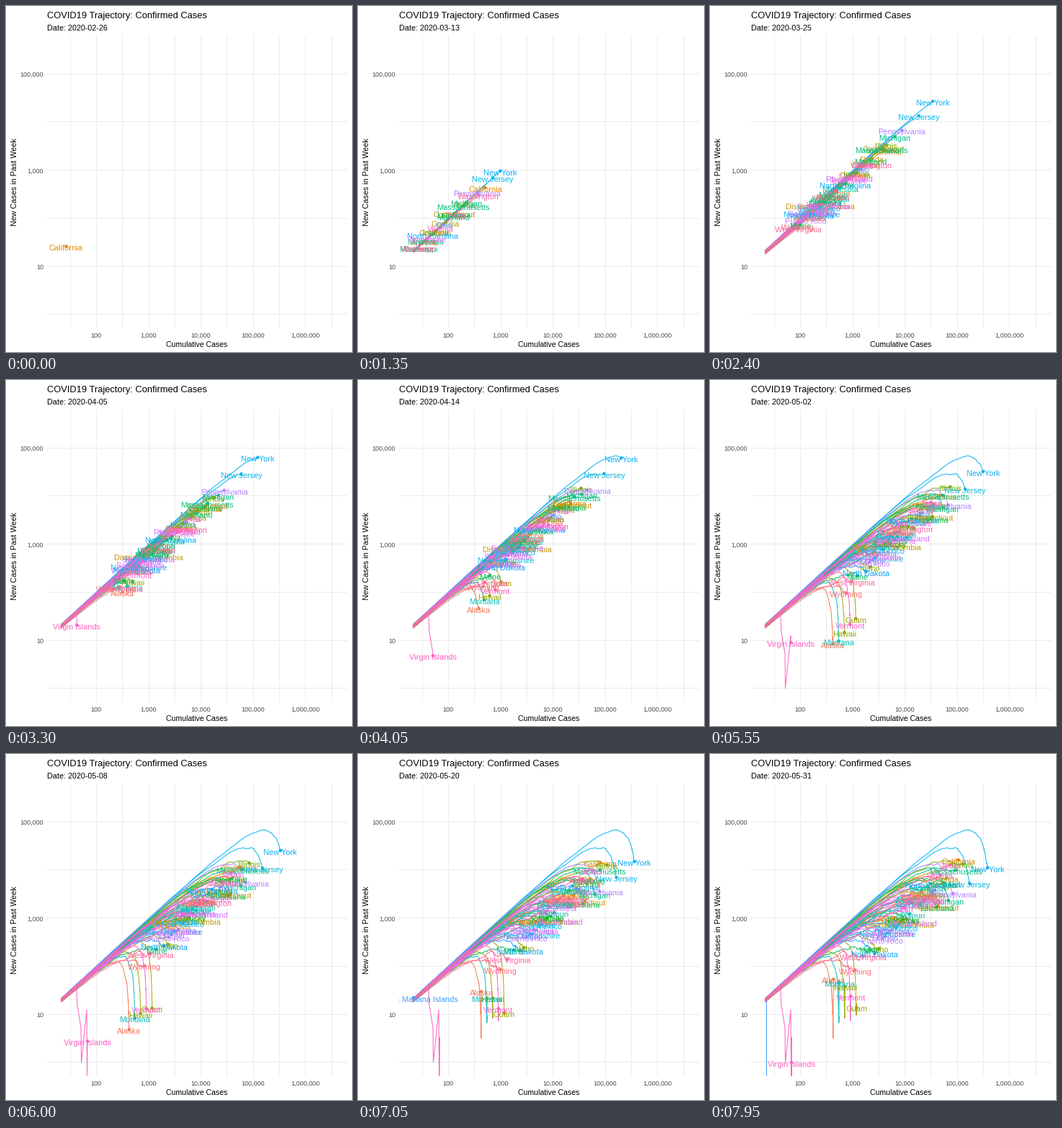
A matplotlib script for the animation above (8000 ms loop, 480 by 480 pixels).

```python
import math

import matplotlib.pyplot as plt
import numpy as np
from matplotlib.animation import FuncAnimation
from matplotlib.collections import LineCollection

SIZE, DPI = 480, 100
LEFT, TOP, RIGHT, BOTTOM = 57, 41, 474, 447
LAST_DAY = 95
MONTHS = ((2, 29), (3, 31), (4, 30), (5, 31))

# Largest outbreak first; the rank sets size and starting day
RANKED = [
    "New York", "New Jersey", "Illinois", "California", "Massachusetts",
    "Pennsylvania", "Texas", "Michigan", "Florida", "Maryland", "Georgia",
    "Virginia", "Connecticut", "Louisiana", "Ohio", "Indiana",
    "North Carolina", "Colorado", "Minnesota", "Tennessee", "Washington",
    "Arizona", "Iowa", "Wisconsin", "Alabama", "Mississippi", "Rhode Island",
    "Nebraska", "Missouri", "South Carolina", "Kansas", "Utah", "Kentucky",
    "Delaware", "District of Columbia", "Nevada", "New Mexico", "Arkansas",
    "Oklahoma", "South Dakota", "New Hampshire", "Oregon", "Puerto Rico",
    "Idaho", "North Dakota", "Maine", "West Virginia", "Wyoming",
]
EARLY = {"California", "Washington"}
COOLING = {"New York", "New Jersey", "Michigan", "Connecticut", "Louisiana",
           "Pennsylvania", "Rhode Island", "Idaho", "North Dakota", "Wyoming"}
GROWING = {"California", "Texas", "Virginia", "North Carolina", "Minnesota",
           "Arizona", "Wisconsin", "Alabama", "Mississippi", "Nebraska",
           "South Carolina", "Utah", "Arkansas"}
FADING = ["Guam", "Vermont", "Hawaii", "Montana", "Alaska"]

plt.rcParams["font.family"] = "Liberation Sans"
rng = np.random.default_rng(19)
tracks = {}


def px_x(cases):
    return 125.5 + 72.6 * (np.log10(cases) - 2)


def px_y(cases):
    return 361 - 66.75 * (np.log10(cases) - 1)


def grow(name, start, total, ratio, k, rebound=0):
    """Exponential growth that slows at rate k to a final weekly share of new cases."""
    span = LAST_DAY - start
    rate = -math.log(1 - ratio) / 7
    rest = math.exp(-k * span)
    gain = (math.log(total / 21) - rate * span) / (1 - rest - k * span * rest)
    drift = rate - gain * k * rest

    def cumulative(tau):
        return 21 * np.exp(gain * (1 - np.exp(-k * tau)) + drift * tau)

    days = np.arange(start, LAST_DAY + 1)
    cases = cumulative(days - start)
    new = cases - cumulative(days - start - 7.0)
    new += rebound * np.clip((days - 74) / 20, 0, 1)
    # Small counts swing more
    noise = np.convolve(rng.normal(size=len(days) + 4), np.ones(5) / 5, "valid")
    swing = (2 + 25 / np.sqrt(new)) * np.clip((days - start) / 30, 0, 1)
    tracks[name] = days, px_x(cases), px_y(new) + noise * swing


def trace(name, *stops):
    """Straight moves between (day, x, y) stops."""
    tracks[name] = tuple(np.array(stops, float).T)


for rank, name in enumerate(RANKED):
    size = 5.575 - 0.59 * rank / (rank + 0.9) - 0.0325 * rank - 0.3 * (rank / 46) ** 16
    start = 5 if name in EARLY else round(9 + rank / 4)
    if name in COOLING:
        ratio, slowing = 0.028 + rank / 1000, 0.075
    elif name in GROWING:
        ratio, slowing = 0.16, 0.055
    else:
        ratio, slowing = 0.095, 0.058
    grow(name, start, 10 ** size, ratio, slowing)

for rank, name in enumerate(FADING):
    grow(name, 19, 10 ** (3.07 - 0.11 * rank), 0.003, 0.115, rebound=8 + 12 * rank)

# California is on the chart from the first day
tracks["California"] = tuple(
    np.r_[first, rest] for first, rest in zip((0, 83, 333), tracks["California"]))

trace("Northern Mariana Islands", (81, 76.5, 338), (88, 77.5, 338), (90, 77.5, 470))
trace("Virgin Islands", (33, 93, 322), (37, 98, 324), (40, 98.5, 346), (48, 104, 380),
      (52, 104.5, 428), (66, 112, 355), (68, 112.5, 446), (72, 113, 393),
      (74, 113, 470), (93, 113, 470), (95, 113, 428))

names = sorted(tracks)


def hcl(hue, chroma=100, light=65):
    """Polar LUV colour to sRGB."""
    angle = math.radians(hue)
    u = chroma * math.cos(angle) / (13 * light) + 0.19783
    v = chroma * math.sin(angle) / (13 * light) + 0.46832
    lum = ((light + 16) / 116) ** 3
    xyz = np.array([9 * u / (4 * v), 1, (12 - 3 * u - 20 * v) / (4 * v)]) * lum
    matrix = np.array([[3.2406, -1.5372, -0.4986],
                       [-0.9689, 1.8758, 0.0415],
                       [0.0557, -0.2040, 1.0570]])
    rgb = np.clip(matrix @ xyz, 0.0031308, 1)
    return tuple(np.clip(1.055 * rgb ** (1 / 2.4) - 0.055, 0, 1))


colors = [hcl(15 + 360 * i / len(names)) for i in range(len(names))]


def points(pixels):
    return pixels * 72 / DPI


fig = plt.figure(figsize=(SIZE / DPI, SIZE / DPI), dpi=DPI, facecolor="white")
page = fig.add_axes([0, 0, 1, 1], xlim=(0, SIZE), ylim=(SIZE, 0))
panel = fig.add_axes([LEFT / SIZE, 1 - BOTTOM / SIZE, (RIGHT - LEFT) / SIZE,
                      (BOTTOM - TOP) / SIZE], xlim=(LEFT, RIGHT), ylim=(BOTTOM, TOP))
page.axis("off")
panel.axis("off")


def write(x, y, text, size, **style):
    return page.text(x, y, text, fontsize=points(size), va="baseline", **style)


# Unsnapped lines through pixel centres stay one pixel wide
grid = dict(color="#EBEBEB", lw=points(1), snap=False, zorder=0)
for step in range(11):
    x = math.floor(89.2 + 36.28 * step) + 0.5
    panel.plot([x, x], [TOP, BOTTOM], **grid)
for step in range(6):
    y = round(93.7 + 66.75 * step) + 0.5
    panel.plot([LEFT, RIGHT], [y, y], **grid)

for power in range(2, 7):
    write(px_x(10 ** power) - 0.5, 460, f"{10 ** power:,}", 9, ha="center", color="#4D4D4D")
for power in (1, 3, 5):
    write(52, px_y(10 ** power) + 4, f"{10 ** power:,}", 9, ha="right", color="#4D4D4D")

write(57, 17, "COVID19 Trajectory: Confirmed Cases", 12.85)
date_text = write(57, 34, "", 10.8)
write(265, 473, "Cumulative Cases", 10.5, ha="center")
page.text(17.3, 244, "New Cases in Past Week", fontsize=points(10.8), rotation=90,
          ha="right", va="center")

trails = LineCollection([], linewidths=points(1), zorder=2)
panel.add_collection(trails, autolim=False)
heads = panel.scatter([], [], s=points(4.5) ** 2, linewidths=0, zorder=3)
labels = [panel.text(0, 0, name, color=color, fontsize=points(11), ha="center",
                     va="baseline", clip_on=True, zorder=4)
          for name, color in zip(names, colors)]


def date_of(day):
    day += 26
    for month, length in MONTHS:
        if day <= length:
            return f"Date: 2020-{month:02d}-{day:02d}"
        day -= length


def draw(tick):
    time = min(max(0, 1.8 * (tick // 3) - 0.4), LAST_DAY)
    date_text.set_text(date_of(round(time)))
    segments, ends, shown = [], [], []
    for name, color, label in zip(names, colors, labels):
        days, xs, ys = tracks[name]
        active = bool(time >= days[0])
        label.set_visible(active)
        if not active:
            continue
        head = np.interp(time, days, xs), np.interp(time, days, ys)
        past = days < time
        segments.append(np.vstack([np.column_stack([xs[past], ys[past]]), head]))
        ends.append(head)
        shown.append(color)
        label.set_position((head[0], head[1] + 5.7))
    trails.set_segments(segments)
    trails.set_color(shown)
    heads.set_offsets(ends)
    heads.set_facecolor(shown)
    return [date_text, trails, heads, *labels]


animation = FuncAnimation(fig, draw, frames=160, interval=50, repeat=True,
                          repeat_delay=0, blit=False)
plt.show()
```
